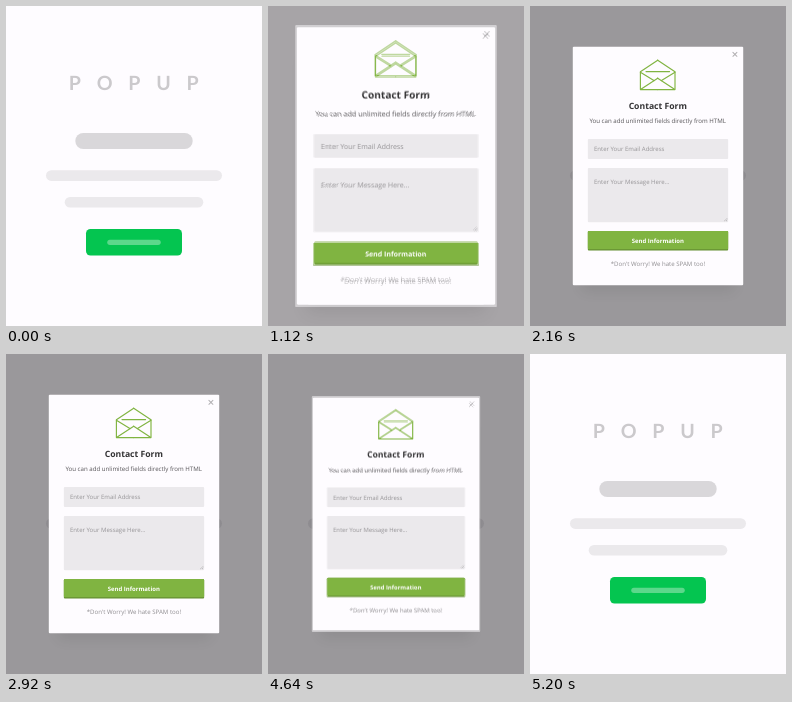
Write an HTML page with a canvas that moves like this. It is 256 px wide and 320 px high and loops after 5.96 s.

```html
<!DOCTYPE html>
<html lang="en">
<head>
<meta charset="utf-8">
<title>Popup</title>
<style>
  html, body { margin: 0; width: 100%; height: 100%; overflow: hidden; background: #fefcff; }
  canvas { display: block; width: 256px; height: 320px; }
</style>
</head>
<body>
<canvas id="stage"></canvas>
<script>
const W = 256, H = 320, MID = W / 2, LOOP = 5960, STEP = 40;
const OPEN = 800, SHUT = 5140, SWING = 285, REBOUND = 0.19;
const BLEND_GAP = 24, BLEND_MIN = 0.01;
const PAPER = '#fefcff', FIELD = '#ebe9ec', LEAF = '#80b441', HINT = '#969497';
const SANS = '"Open Sans", sans-serif';

const dpr = window.devicePixelRatio || 1;
const stage = document.getElementById('stage');
const buffer = document.createElement('canvas');
for (const c of [stage, buffer]) {
  c.width = Math.round(W * dpr);
  c.height = Math.round(H * dpr);
}
const out = stage.getContext('2d');
const g = buffer.getContext('2d');
g.scale(dpr, dpr);
g.textRendering = 'geometricPrecision';

const clamp = v => Math.min(1, Math.max(0, v));
const easeOut = p => 1 - (1 - p) ** 2;
const easeInOut = p => (1 - Math.cos(Math.PI * p)) / 2;

// Damped spring from 0 to 1; each swing keeps REBOUND of the one before
function spring(ms) {
  if (ms <= 0) return 0;
  const swings = ms / SWING, angle = Math.PI * swings;
  const damping = -Math.log(REBOUND) / Math.PI;
  return 1 - REBOUND ** swings * (Math.cos(angle) + damping * Math.sin(angle));
}

// Closing is the opening spring run backwards
const popupScale = t => spring(Math.min(t - OPEN, SHUT - t));

function dimming(t) {
  const shown = easeOut(clamp((t - OPEN + 10) / 520));
  const hidden = easeInOut(clamp((t - 4860) / 335));
  return 0.4 * shown * (1 - hidden);
}

function box(x, y, w, h, r, color) {
  g.fillStyle = color;
  g.beginPath();
  g.roundRect(x, y, w, h, r);
  g.fill();
}

const bar = (y, w, h, color, r = h / 2) => box(MID - w / 2, y, w, h, r, color);

function text(str, x, y, size, color, { weight = 400, align = 'center', family = SANS, spacing = 0 } = {}) {
  g.font = `${weight} ${size}px ${family}`;
  g.letterSpacing = spacing + 'px';
  g.textAlign = align;
  g.fillStyle = color;
  g.fillText(str, x, y);
}

function line(color, width, ...points) {
  g.strokeStyle = color;
  g.lineWidth = width;
  g.lineJoin = g.lineCap = 'round';
  g.beginPath();
  for (const [x, y] of points) g.lineTo(x, y);
  g.stroke();
}

function drawPage() {
  g.fillStyle = PAPER;
  g.fillRect(0, 0, W, H);
  text('POPUP', 62.7, 84.2, 19.6, '#cbc9cc',
    { weight: 700, align: 'left', family: 'Lato, sans-serif', spacing: 15.8 });
  bar(127, 117.4, 16, '#d9d7da');
  bar(164.2, 176, 10.7, FIELD);
  bar(191, 138.6, 10.6, FIELD);
  bar(223, 96, 26.5, '#04c550', 4.5);
  bar(233.7, 53.5, 5.3, '#5cd88b');
}

function drawEnvelope(x, y) {
  g.save();
  g.translate(x, y);
  for (const side of [-1, 1]) {
    g.save();
    g.scale(side, 1);
    line(LEAF, 1.15, [0, 0], [17.3, 11.6], [17.3, 29.4], [0, 29.4]);
    line(LEAF, 1.15, [17.3, 12], [3.8, 20.4]);
    line(LEAF, 1.15, [16.8, 29], [0, 18]);
    g.restore();
  }
  line(LEAF, 1.1, [-11.7, 11.4], [11.9, 11.4]);
  g.restore();
}

function drawClose(x, y, r) {
  for (const side of [-1, 1]) line('#b2b0b3', 1, [x - r, y - side * r], [x + r, y + side * r]);
}

function drawPopup(scale) {
  g.save();
  g.translate(MID, H / 2);
  g.scale(scale, scale);
  g.translate(-MID, -H / 2);

  g.save();
  g.shadowColor = 'rgba(0,0,0,0.08)';
  g.shadowBlur = 14 * scale * dpr;
  g.shadowOffsetY = 6 * scale * dpr;
  bar(60, 152, 219, PAPER, 1);
  g.restore();
  bar(40.7, 170.4, 238.6, PAPER, 1);

  drawClose(204.9, 48.3, 2);
  drawEnvelope(127.7, 54.2);
  text('Contact Form', 127.8, 102.6, 8.65, '#343335', { weight: 700 });
  text('You can add unlimited fields directly from HTML', 127.7, 117.5, 6.14, '#575558');

  bar(133, 140.3, 20, FIELD, 1);
  text('Enter Your Email Address', 64, 145.4, 6.03, HINT, { align: 'left' });
  bar(162, 140.3, 54.2, FIELD, 1);
  text('Enter Your Message Here...', 64, 178.3, 6.03, HINT, { align: 'left' });
  for (const d of [1, 2.6]) line('#a09ea1', 0.5, [197 - d, 215], [197, 215 - d]);

  bar(225, 140.3, 19.6, '#648f31', 1);
  bar(225, 140.3, 18.2, LEAF, 1);
  text('Send Information', 127.8, 237, 5.97, '#ffffff', { weight: 700 });
  text("*Don't Worry! We hate SPAM too!", 127.9, 260, 6.1, '#8f8d90');
  g.restore();
}

function drawScene(t) {
  drawPage();
  g.fillStyle = `rgba(4,0,5,${dimming(t)})`;
  g.fillRect(0, 0, W, H);
  const scale = popupScale(t);
  if (scale > 0.002) drawPopup(scale);
}

// Fast motion shows two neighbouring moments blended evenly
function render(t) {
  const before = t - BLEND_GAP / 2, after = t + BLEND_GAP / 2;
  const fast = Math.abs(popupScale(after) - popupScale(before)) > BLEND_MIN;
  const moments = fast ? [before, after] : [t];
  moments.forEach((moment, i) => {
    drawScene(moment);
    out.globalAlpha = 1 / (i + 1);
    out.drawImage(buffer, 0, 0);
  });
}

const start = performance.now();
let shown = -1;
function tick() {
  const t = Math.floor(((performance.now() - start) % LOOP) / STEP) * STEP;
  if (t !== shown) render(shown = t);
  requestAnimationFrame(tick);
}
tick();
</script>
</body>
</html>
```
